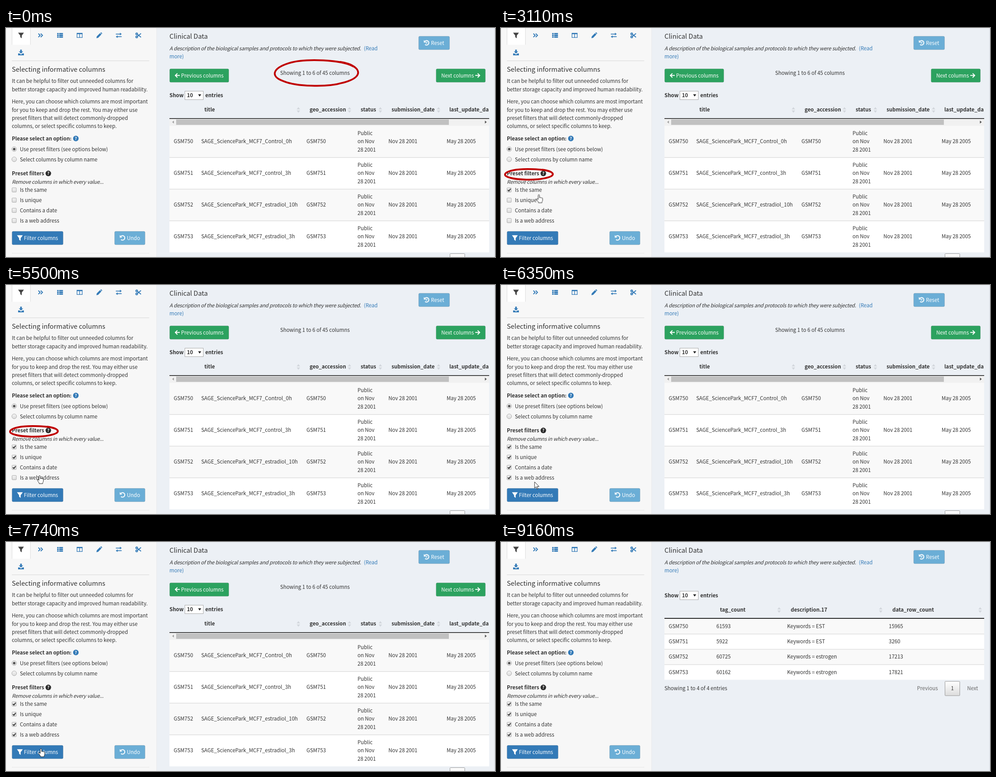
These frames come from a looping animation (1092x513 px, 9480 ms). An HTML page:

```html
<!DOCTYPE html>
<html lang="en">
<head>
<meta charset="utf-8">
<title>Clinical Data</title>
<style>
html, body { margin: 0; width: 100%; height: 100%; overflow: hidden; background: #ecf0f5; }
svg { display: block; }
text {
  font: 11.5px "Noto Sans CJK JP", "Noto Sans CJK SC", "Noto Sans CJK KR", "Noto Sans CJK TC", "Noto Sans CJK", "Noto Sans", sans-serif;
  fill: #333; white-space: pre;
}
.b { font-weight: 700; }
.h { font-size: 14.75px; }
.i { font-style: italic; letter-spacing: -.235px; word-spacing: .23px; }
.w { fill: #fff; }
.l { fill: #337ab7; }
.g { fill: #666; }
.mid { text-anchor: middle; }
.q { font-size: 9.5px; font-weight: 700; fill: #fff; text-anchor: middle; }
.line { fill: none; stroke: currentColor; stroke-width: 2; }
.fill { fill: currentColor; fill-rule: evenodd; }
.ring { fill: none; stroke: #c00000; stroke-width: 4; stroke-linecap: round; stroke-linejoin: round; }
.draw { stroke-dasharray: 1 1; }

#ring1, #ring2, #ring3, #before, #after, .tick, #cursor, #pos, #hand, #arrow, #go {
  animation: 9480ms step-end infinite;
}
#ring1 { animation-name: ring1; }
#ring2 { animation-name: ring2; }
#ring3 { animation-name: ring3; }
#before { animation-name: before; }
#after { animation-name: after; }
#tick0 { animation-name: tick0; }
#tick1 { animation-name: tick1; }
#tick2 { animation-name: tick2; }
#tick3 { animation-name: tick3; }
#cursor { animation-name: fade; }
#pos { animation-name: move; }
#hand { animation-name: hand; }
#arrow { animation-name: arrow; }
#go { animation-name: press; }

@keyframes ring1 { 0% { visibility: visible; } 19.72%, 100% { visibility: hidden; } }
@keyframes ring2 {
  0% { visibility: hidden; stroke-dashoffset: 1; }
  20.56% { visibility: visible; stroke-dashoffset: 1; animation-timing-function: steps(5, jump-both); }
  24.57% { visibility: visible; stroke-dashoffset: 0; }
  66.13%, 100% { visibility: hidden; stroke-dashoffset: 0; }
}
@keyframes ring3 {
  0% { visibility: hidden; stroke-dashoffset: 1; }
  68.56% { visibility: visible; stroke-dashoffset: 1; animation-timing-function: steps(7, jump-both); }
  74.26% { visibility: visible; stroke-dashoffset: 0; }
  81.64%, 100% { visibility: hidden; stroke-dashoffset: 0; }
}
@keyframes before { 0% { visibility: visible; } 82.48%, 100% { visibility: hidden; } }
@keyframes after { 0% { visibility: hidden; } 82.48%, 100% { visibility: visible; } }
@keyframes tick0 { 0% { visibility: hidden; } 29.53%, 100% { visibility: visible; } }
@keyframes tick1 { 0% { visibility: hidden; } 41.66%, 100% { visibility: visible; } }
@keyframes tick2 { 0% { visibility: hidden; } 52.32%, 100% { visibility: visible; } }
@keyframes tick3 { 0% { visibility: hidden; } 62.86%, 100% { visibility: visible; } }
@keyframes fade {
  0% { opacity: 0; }
  20.56% { opacity: 0; animation-timing-function: steps(5, jump-both); }
  24.57% { opacity: 1; }
  94.19% { opacity: 1; animation-timing-function: steps(3, jump-both); }
  96.62%, 100% { opacity: 0; }
}
@keyframes move {
  0% { transform: translate(91px, 365px); }
  31.96% { transform: translate(91px, 365px); animation-timing-function: steps(3, jump-both); }
  34.38% { transform: translate(78px, 382px); }
  41.66% { transform: translate(78px, 382px); animation-timing-function: steps(7, jump-both); }
  47.36% { transform: translate(75px, 409px); }
  54.74% { transform: translate(75px, 409px); animation-timing-function: steps(4, jump-both); }
  58.01% { transform: translate(75px, 427px); }
  66.13% { transform: translate(75px, 434px); }
  66.98% { transform: translate(75px, 441px); }
  68.56% { transform: translate(75px, 441px); animation-timing-function: steps(3, jump-both); }
  71%, 100% { transform: translate(78px, 463px); }
}
@keyframes hand { 0% { visibility: visible; } 66.98% { visibility: hidden; } 69.4%, 100% { visibility: visible; } }
@keyframes arrow { 0% { visibility: hidden; } 66.98% { visibility: visible; } 69.4%, 100% { visibility: hidden; } }
@keyframes press { 0% { fill: #337ab7; } 79.11% { fill: #286090; } 80.9%, 100% { fill: #337ab7; } }
</style>
</head>
<body>
<svg id="stage" width="1092" height="513" viewBox="0 0 1092 513">
  <defs>
    <linearGradient id="box" x2="0" y2="1"><stop stop-color="#f4f4f4"/><stop offset="1" stop-color="#dcdcdc"/></linearGradient>
    <linearGradient id="page" x2="0" y2="1"><stop stop-color="#fff"/><stop offset="1" stop-color="#dcdcdc"/></linearGradient>
  </defs>
</svg>
<script>
const BLUE = '#337ab7', GREEN = '#2ca25f', SKY = '#6baed6';

const text = (x, y, s, c = '') => `<text x="${x}" y="${y}" class="${c}">${s}</text>`;
const rect = (x, y, w, h, fill, more = '') =>
  `<rect x="${x}" y="${y}" width="${w}" height="${h}" fill="${fill}" ${more}/>`;
const fill = d => `<path class="fill" d="${d}"/>`;
const line = d => `<path class="line" d="${d}"/>`;
const back = line('M-4.3-3A5 5 0 1 1-3.6 3.6') + fill('M-6.5-6.2v5.4h5.4z');

const icons = {
  filter: fill('M-6.5-6h13L1.7.6V6.6L-1.7 4V.6z'),
  angles: line('M-4.7-4l4 4-4 4M.5-4l4 4-4 4'),
  list: fill([-5.3, -1.5, 2.3].map(y => `M-6.5 ${y}h3.4v3h-3.4zM-2 ${y}h8.5v3h-8.5z`).join('')),
  columns: fill('M-6.5-5.5h13v11h-13zM-5.2-2.8v7h4.5v-7zM.7-2.8v7h4.5v-7z'),
  pencil: fill('M-6.2 6.2l.8-3.9L1.9-4.9l3 3L-2.3 5.4zM2.7-5.7l1-.8q.6-.4 1.2.1l1.5 1.5q.5.6 0 1.2l-.8.9z'),
  exchange: fill('M-6.5-3.7H2.6V-6L6.6-2.9 2.6.1V-2.1H-6.5zM6.5 3.7H-2.6V6L-6.6 2.9-2.6-.1V2.1H6.5z'),
  scissors: line('M-2-2.2L6 4.2M-2 2.2L6-4.2') +
    '<g class="line"><circle cx="-3.6" cy="-3.4" r="1.9"/><circle cx="-3.6" cy="3.4" r="1.9"/></g>',
  download: fill('M-1.8-6.5h3.6v4h3L0 2.3-4.8-2.5h3zM-6.5 2h3.2L0 4.6 3.3 2h3.2v4.3h-13z'),
  left: line('M5.6 0H-4M.3-4.7L-4.4 0 .3 4.7'),
  right: line('M-5.6 0H4M-.3-4.7L4.4 0-.3 4.7'),
  undo: back,
  history: back + '<path d="M.4-2.8v3.3h-2.6" fill="none" stroke="currentColor" stroke-width="1.3"/>'
};
const icon = (name, x, y, color = '#fff') =>
  `<g transform="translate(${x} ${y})" color="${color}">${icons[name]}</g>`;
const button = (x, y, w, color, glyph, gx, label, lx, more = '') =>
  rect(x + .5, y + .5, w - 1, 30, color, `rx="2.5" stroke="#000" stroke-opacity=".12" ${more}`) +
  icon(glyph, gx, y + 15.3) + text(lx, y + 19.6, label, 'w');
const help = (x, y, color) =>
  `<circle cx="${x}" cy="${y}" r="6.2" fill="${color}"/>` + text(x, y + 3.5, '?', 'q');
const sorter = (x, y) => `<path d="M${x - 3.8} ${y - 1.2}l3.8-5 3.8 5zM${x - 3.8} ${y + 1.2}l3.8 5 3.8-5z" fill="#d2d6dc"/>`;
const entries = y => text(365, y + 4.2, 'Show', 'b') +
  rect(399.5, y - 9.5, 41, 19, '#fff', 'stroke="#a9a9a9"') + text(404, y + 4.2, '10', 'b') +
  `<path d="M429 ${y - 2.5}h7l-3.5 5z" fill="#222"/>` + text(445, y + 4.2, 'entries', 'b');
const pager = y => rect(991.5, y, 33, 32, 'url(#page)', 'stroke="#979797" rx="1"');

// A hand-drawn loop fitted to a box
function ring(id, x, y, w, h, c = '') {
  const loop = [[.95, .25], [.82, -.02], [.36, -.08], [.16, .12], [-.05, .33], [-.06, .66], [.1, .83],
    [.25, 1.03], [.62, 1.08], [.82, .89], [1.05, .7], [1.04, .4], [.94, .22], [.91, .16], [.85, .1], [.79, .07]];
  const p = loop.map(([u, v]) => `${(x + u * w).toFixed(1)} ${(y + v * h).toFixed(1)}`);
  return `<path id="${id}" class="ring ${c}" pathLength="1" d="M${p[0]}C${p.slice(1).join(' ')}"/>`;
}

function sidebar() {
  let s = rect(0, 0, 336, 513, '#f7f7f7') + rect(336, 0, 1, 513, '#e6e8ec') +
    rect(13, 73, 307, 1, '#d8d8d8') + rect(13, 504, 307, 1, '#e6e6e6');
  s += '<path d="M13.5 0V37.5M54.5 0V37.5" stroke="#ddd"/>' + rect(14, 0, 40, 37.5, '#fff');
  s += icon('filter', 33.5, 16.5, '#444');
  ['angles', 'list', 'columns', 'pencil', 'exchange', 'scissors'].forEach((n, i) => s += icon(n, 77 + i * 43.7, 16.5, BLUE));
  s += icon('download', 33.5, 55, BLUE) + text(13, 98, 'Selecting informative columns', 'h');
  const paras = [
    [123.2, 'It can be helpful to filter out unneeded columns for', 'better storage capacity and improved human readability.'],
    [169.2, 'Here, you can choose which columns are most important', 'for you to keep and drop the rest. You may either use',
      'preset filters that will detect commonly-dropped', 'columns, or select specific columns to keep.']
  ];
  for (const [y, ...lines] of paras) lines.forEach((t, i) => s += text(13, y + i * 18.4, t));
  s += text(13, 252, 'Please select an option:', 'b') + help(156, 247.5, BLUE);
  ['Use preset filters (see options below)', 'Select columns by column name'].forEach((t, i) => {
    const y = 271.2 + i * 23;
    s += `<circle cx="18.3" cy="${y}" r="5.3" fill="url(#box)" stroke="#aaa"/>` + text(31, y + 4.3, t);
  });
  s += '<circle cx="18.3" cy="271.2" r="2.8" fill="#555"/>';
  s += text(13, 330.2, 'Preset filters', 'b') + help(94.5, 325.8, '#2b2b2b');
  s += text(13, 348.8, 'Remove columns in which every value...', 'i');
  ['Is the same', 'Is unique', 'Contains a date', 'Is a web address'].forEach((t, i) => {
    const y = 363 + i * 22.9;
    s += rect(13.5, y - 5, 9.5, 9.5, 'url(#box)', 'stroke="#aaa" rx="1"') + text(31, y + 4.3, t) +
      `<path id="tick${i}" class="tick" d="M15.3 ${y - .3}l2.3 2.5 4-5.2" fill="none" stroke="#333" stroke-width="2"/>`;
  });
  s += button(13, 455, 115, BLUE, 'filter', 31, 'Filter columns', 40, 'id="go"');
  return s + button(242, 455, 69, SKY, 'undo', 260.5, 'Undo', 270);
}

function header() {
  return text(365, 23.8, 'Clinical Data', 'h') +
    text(365, 49.5, 'A description of the biological samples and protocols to which they were subjected.', 'i') +
    text(799, 49.5, '(Read', 'l') + text(365, 68, 'more)', 'l') +
    button(921, 18, 70, SKY, 'history', 939.5, 'Reset', 949) + rect(1090.5, 0, 1, 513, '#d9dee5');
}

function grid(top, rowHeight, rows, cols) {
  return rows.map((cells, r) => {
    const y = top + r * rowHeight, mid = y + rowHeight / 2 + 4;
    return rect(365, y, 714, rowHeight, r % 2 ? '#fff' : '#f9f9f9') +
      (r ? rect(365, y - .5, 714, 1.4, '#ddd') : '') +
      cells.map((c, i) => {
        const lines = [].concat(c);
        return lines.map((t, k) => text(cols[i], mid + (k - (lines.length - 1) / 2) * 18.4, t)).join('');
      }).join('');
  }).join('');
}

function before() {
  let s = button(365, 91, 133, GREEN, 'left', 382.5, 'Previous columns', 391) +
    button(960, 91, 111, GREEN, 'right', 1053.5, 'Next columns', 972) +
    text(690, 104.8, 'Showing 1 to 6 of 45 columns', 'mid') + entries(151);
  [[443, 'title'], [678, 'geo_accession'], [792, 'status'], [861, 'submission_date'], [990, 'last_update_da']]
    .forEach(([x, t]) => s += text(x, 187.2, t, 'b'));
  s += [653, 767, 836, 966].map(x => sorter(x, 183.5)).join('');
  s += rect(365, 203, 714, 16, '#f1f1f1') + rect(365, 202, 714, 1.5, '#111') + rect(380, 205, 609, 12, '#c1c1c1') +
    '<path d="M375 207.5v6.6l-4-3.3z" fill="#a3a3a3"/><path d="M1069.5 207.5v6.6l4-3.3z" fill="#505050"/>';
  const samples = ['Control_0h', 'control_3h', 'estradiol_10h', 'estradiol_3h'];
  const rows = samples.map((n, i) => ['GSM75' + i, 'SAGE_SciencePark_MCF7_' + n, 'GSM75' + i,
    ['Public', 'on Nov', '28 2001'], 'Nov 28 2001', 'May 28 2005']);
  return s + grid(219, 70.9, rows, [374.5, 436, 671, 785, 854, 984]) + pager(505.5);
}

function after() {
  let s = entries(119.7);
  [[489, 'tag_count'], [647, 'description.17'], [874, 'data_row_count']].forEach(([x, t]) => s += text(x, 156.2, t, 'b'));
  s += [621, 848, 1070].map(x => sorter(x, 152.3)).join('');
  s += grid(171.8, 34.2, [
    ['GSM750', '61593', 'Keywords = EST', '15965'],
    ['GSM751', '5922', 'Keywords = EST', '3260'],
    ['GSM752', '60725', 'Keywords = estrogen', '17213'],
    ['GSM753', '60162', 'Keywords = estrogen', '17821']
  ], [374.5, 481, 639, 866]) + rect(365, 170.2, 714, 1.8, '#111');
  return s + text(365, 331.5, 'Showing 1 to 4 of 4 entries') + pager(312.2) +
    text(929, 332.2, 'Previous', 'g') + text(1008, 332.2, '1', 'mid') + text(1041, 332.2, 'Next', 'g');
}

const cursor = `<g id="cursor"><g id="pos" fill="#fff" stroke="#222" stroke-linejoin="round">
  <path id="hand" d="M-1.5 10.5V1.5a1.5 1.5 0 0 1 3 0V6.8a1.3 1.3 0 0 1 2.5.3 1.3 1.3 0 0 1 2.4.5 1.1 1.1 0 0 1 2 .6V12c0 2-1 3-1.4 4.4V18H-1V16.5C-2 14.5-4 12.6-5 10.6c-.7-1.5 1-2.4 2-1.3z"/>
  <path id="arrow" d="M0 0V14l3.2-3 2.3 5.2 2.2-1-2.2-4.8H10z"/></g></g>`;

document.getElementById('stage').innerHTML += rect(0, 0, 1092, 513, '#ecf0f5') + sidebar() + header() +
  `<g id="before">${before()}</g><g id="after">${after()}</g>` +
  ring('ring1', 602, 72, 183, 57) + ring('ring2', 10, 316, 105, 23.5, 'draw') +
  ring('ring3', 11, 442.5, 125, 53, 'draw') + cursor;
</script>
</body>
</html>
```
